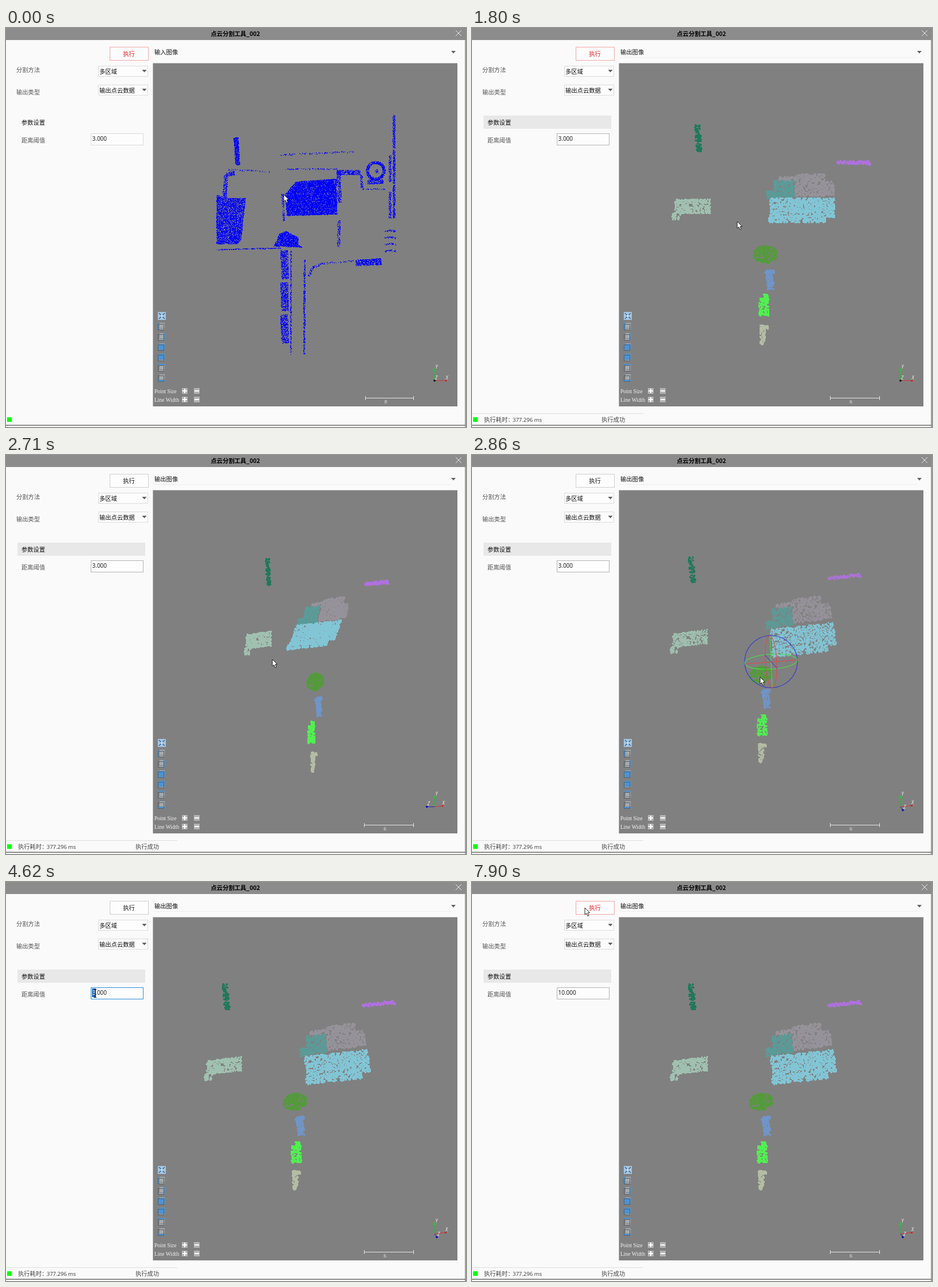
Animation, 803 px wide and 697 px high, one loop 8 s. Source, as an HTML page with a canvas:

```html
<!DOCTYPE html>
<html lang="zh">
<head>
<meta charset="utf-8">
<title>点云分割工具</title>
<style>
  html, body { margin: 0; width: 100%; height: 100%; overflow: hidden; background: #fafafa; }
  canvas { display: block; }
</style>
</head>
<body>
<canvas id="stage" width="803" height="697"></canvas>
<script>
const stage = document.getElementById("stage");
const ctx = stage.getContext("2d");
const LOOP = 8000;
const SANS = '"Noto Sans CJK SC", "Noto Sans CJK", "Noto Sans", sans-serif';
const LATIN = '"Noto Sans", sans-serif';
const SERIF = '"Liberation Serif", serif';

let seed = 7;
const random = () => {
  seed = (seed * 1664525 + 1013904223) % 4294967296;
  return seed / 4294967296;
};
const lerp = (a, b, u) => a + (b - a) * u;
const progress = (t, from, to) => Math.min(1, Math.max(0, (t - from) / (to - from)));
const during = (t, from, to) => t >= from && t < to;
const pairs = flat => Array.from({ length: flat.length / 2 }, (_, i) => [flat[2 * i], flat[2 * i + 1]]);

// ---- raw scan: single-pixel dots, rendered once ----
const scan = document.createElement("canvas");
scan.width = stage.width;
scan.height = stage.height;
const ink = scan.getContext("2d");
ink.fillStyle = "#0000ff";
const speck = (x, y) => ink.fillRect(Math.round(x), Math.round(y), 1, 1);

function patch(density, ...flat) {
  const path = new Path2D();
  pairs(flat).forEach(([x, y]) => path.lineTo(x, y));
  const xs = flat.filter((_, i) => i % 2 === 0), ys = flat.filter((_, i) => i % 2);
  const left = Math.min(...xs), w = Math.max(...xs) - left;
  const top = Math.min(...ys), h = Math.max(...ys) - top;
  for (let i = w * h * density; i > 0; i--) {
    const x = left + random() * w, y = top + random() * h;
    if (ctx.isPointInPath(path, x, y)) speck(x, y);
  }
}
function trail(width, density, ...flat) {
  const pts = pairs(flat);
  pts.slice(1).forEach(([bx, by], k) => {
    const [ax, ay] = pts[k], len = Math.hypot(bx - ax, by - ay);
    for (let i = len * width * density; i > 0; i--) {
      const u = random(), off = (random() - 0.5) * width / len;
      speck(lerp(ax, bx, u) - (by - ay) * off, lerp(ay, by, u) + (bx - ax) * off);
    }
  });
}
const ring = (x, y, r, width, count) => {
  for (let i = 0; i < count; i++) {
    const a = random() * 2 * Math.PI, d = r + (random() - 0.5) * width;
    speck(x + d * Math.cos(a), y + d * Math.sin(a));
  }
};

function renderScan() {
  // left bracket
  trail(8, 2, 401, 191, 404, 239);
  trail(7, 0.9, 399, 253, 384, 256, 381, 295);
  trail(3, 0.25, 386, 247, 465, 251);
  patch(1.4, 367, 291, 388, 297, 418, 297, 410, 370, 403, 377, 367, 377);
  trail(2, 0.9, 367, 387, 480, 384);
  // centre plate and the edges around it
  patch(2.2, 506, 268, 576, 263, 578, 325, 490, 328, 487, 290);
  trail(3, 0.35, 479, 221, 607, 216);
  trail(3, 0.35, 487, 246, 577, 246);
  trail(4, 0.6, 482, 290, 485, 338);
  trail(7, 0.8, 580, 250, 582, 305);
  trail(9, 1, 577, 252, 618, 252);
  trail(4, 0.9, 620, 256, 621, 279);
  trail(2, 0.5, 621, 281, 662, 281);
  trail(5, 0.6, 581, 335, 580, 382);
  // round part
  ring(645, 249, 14.5, 5, 700);
  ring(647, 250, 2, 4, 25);
  trail(8, 1.2, 631, 268, 658, 268);
  // right rails, then the shelves below them
  for (let y = 152; y < 300; y += 61) trail(4, 1.2, 677, y, 677, y + 58);
  for (let y = 222; y < 300; y += 64) trail(4, 1, 670, y, 670, y + 46);
  for (let y = 355; y < 392; y += 11.6) trail(3, 0.8, 661, y, 671, y - 2, 680, y);
  // lower shapes
  patch(2, 467, 381, 477, 359, 488, 354, 510, 366, 510, 378, 517, 383);
  trail(11, 1.2, 610, 410, 655, 408);
  trail(3, 0.35, 550, 411, 655, 403);
  trail(4, 0.7, 528, 434, 534, 419, 550, 412);
  // stem, narrowing downwards
  for (let y = 388; y < 550; y += 56) trail(13, 1, 485, y, 487, y + 50);
  trail(2, 0.9, 497, 388, 497, 570);
  trail(3, 1, 521, 404, 520, 570);
}
renderScan();

// ---- segmented cloud: points in space, seen through linear views ----
// Each view gives screen x and y as weights of [1, x, y, depth].
const FRONT = [[0, 1, 0, 0], [0, 0, 1, 0]];
const SIDE = [[209.5, 0.656, 0, -1], [43.6, -0.08, 1, -0.05]];
const FINAL = [[-8.1, 0.978, 0.03, 0.25], [56.6, -0.106, 0.965, 0.37]];

const segments = [];
// Boxes are [left, top, width, height, lean]; tilt is the depth gained per pixel downwards.
function segment(color, depth, tilt, boxes, round = false) {
  const [, top, , height] = boxes[0], points = [];
  for (const [x, y, w, h, lean = 0] of boxes) {
    for (let i = w * h * 0.24; i > 0; i--) {
      const u = random(), v = random();
      if (round && Math.hypot(u - 0.5, v - 0.5) > 0.5) continue;
      const py = y + v * h;
      points.push([1, x + u * w + lean * v, py, depth + tilt * (py - top - height / 2)]);
    }
  }
  segments.push({ color, points });
}
segment("#20785a", 0, 0, [[389, 169, 9, 47, 3]]);
segment("#b070e0", 0, 0, [[637, 232, 55, 6], [690, 232, 4, 8, 4]]);
segment("#96929a", 31, 0.3, [[564, 255, 52, 39], [536, 260, 30, 9], [614, 268, 18, 24]]);
segment("#5a9b98", 36, 0.3, [[527, 266, 36, 30], [514, 285, 14, 13]]);
segment("#82c5d5", 53, 0.45, [[520, 297, 113, 34], [518, 329, 99, 11]]);
segment("#a0c0b0", 12, 0, [[354, 299, 62, 25], [352, 322, 14, 13, -5]]);
segment("#549a3c", 0, 0, [[491, 380, 42, 31]], true);
segment("#7095c8", 0, 0, [[512, 423, 12, 34, 4], [511, 423, 17, 5]]);
segment("#50f050", 7, 0, [[501, 472, 17, 31], [508, 465, 10, 8]]);
segment("#b4bca4", 2, 0, [[503, 519, 9, 34], [503, 519, 14, 7]]);

function cameraAt(t) {
  if (t < 2200) return FRONT;
  const u = t < 2860 ? 0.13 * progress(t, 2200, 2710) : 1;
  return SIDE.map((row, i) => row.map((v, k) => lerp(v, FINAL[i][k], u)));
}

function drawSegments(t, dragging) {
  const size = dragging ? 2.5 : 3;
  const [vx, vy] = cameraAt(t);
  const dot3 = (row, p) => row[0] + row[1] * p[1] + row[2] * p[2] + row[3] * p[3];
  for (const { color, points } of segments) {
    ctx.fillStyle = color;
    for (const p of points)
      ctx.fillRect(Math.round(dot3(vx, p) - 1.5), Math.round(dot3(vy, p) - 1.5), size, size);
  }
}

// ---- pointer: each move runs from start to end time towards x, y ----
const moves = [
  [100, 270, 534, 329], [900, 1220, 530, 348], [1300, 1380, 493, 349], [1450, 1650, 466, 335],
  [1750, 2050, 449, 352], [2150, 2200, 436, 334], [2600, 2860, 503, 388], [3100, 3290, 165, 198],
  [3500, 4470, 148, 194], [4500, 4620, 155, 194], [6900, 7070, 195, 165], [7070, 7590, 199, 52], [7650, 7750, 197, 45]
];
const pointerAt = t => moves.reduce(([x, y], [from, to, nx, ny]) => {
  const u = progress(t, from, to);
  return [lerp(x, nx, u), lerp(y, ny, u)];
}, [485, 291]);

// ---- drawing helpers ----
function rect(x, y, w, h, fill, border) {
  if (fill) { ctx.fillStyle = fill; ctx.fillRect(x, y, w, h); }
  if (border) { ctx.strokeStyle = border; ctx.lineWidth = 1; ctx.strokeRect(x + 0.5, y + 0.5, w - 1, h - 1); }
}
function text(str, x, y, color = "#111", font = "10.3px " + SANS, align = "left") {
  ctx.font = font; ctx.fillStyle = color; ctx.textAlign = align;
  ctx.fillText(str, x, y);
}
function line(color, width, ...flat) {
  ctx.strokeStyle = color; ctx.lineWidth = width;
  ctx.beginPath();
  pairs(flat).forEach(([x, y]) => ctx.lineTo(x, y));
  ctx.stroke();
}
function shape(fill, ...flat) {
  ctx.fillStyle = fill;
  ctx.beginPath();
  pairs(flat).forEach(([x, y]) => ctx.lineTo(x, y));
  ctx.fill();
}
function oval(color, rx, ry, angle = 0) {
  ctx.strokeStyle = color; ctx.lineWidth = 1.1;
  ctx.beginPath();
  ctx.ellipse(522, 361, rx, ry, angle, 0, 7);
  ctx.stroke();
}
function dot(color, x, y, r) {
  ctx.fillStyle = color;
  ctx.beginPath();
  ctx.arc(x, y, r, 0, 7);
  ctx.fill();
}
const downArrow = (x, y) => shape("#606060", x - 4, y - 2, x + 4, y - 2, x, y + 2.5);

function combo(label, y, hover) {
  rect(161, y, 87, 19, "#fdfdfd", hover ? "#7ab8e8" : "#dcdcdc");
  text(label, 163, y + 13.5);
  downArrow(241.5, y + 9);
}

function thresholdField(t) {
  const value = t < 5900 ? "3.000" : t < 6050 ? "1.000" : "10.000";
  const active = during(t, 3290, 7900);
  rect(148, 184, 92, 21, "#fdfdfd", active ? "#2a90e0" : t < 150 ? "#dadada" : "#b4b4b4");
  text(value, 150.5, 197, "#222", "10px " + LATIN);
  if (during(t, 4230, 5900)) {
    rect(150, 186, 7, 15, "#1874cd");
    text("3", 150.5, 197, "#fff", "10px " + LATIN);
  }
  if (during(t, 5470, 6610) || during(t, 7070, 7750)) rect(t < 6050 ? 156 : 162, 186, 1, 14, "#111");
}

function panel(t) {
  const ran = t >= 150;
  const hot = t < 2200 || t >= 7470;
  rect(0, 0, 803, 697, "#fafafa");
  rect(0, 0, 803, 21, "#8c8c8c");
  rect(801, 21, 2, 676, "#a0a0a0");
  rect(0, 693, 803, 2, "#8c8c8c");
  text("点云分割工具_002", 400.5, 14, "#000", "bold 10.3px " + SANS, "center");
  line("#e8e8e8", 1, 785, 4, 795, 14);
  line("#e8e8e8", 1, 795, 4, 785, 14);

  rect(181, 33, 68, 24, "#fdfdfd", hot ? "#f2a8a8" : "#d0d0d0");
  text("执行", 214.5, 48.5, hot ? "#f01818" : "#111", undefined, "center");
  text(ran ? "输出图像" : "输入图像", 259, 46);
  if (ran) rect(257, 51, 520, 1, "#eeeeee");
  downArrow(781, 42);

  text("分割方法", 18, 77, "#555");
  text("输出类型", 18, 116, "#555");
  combo("多区域", 66);
  combo("输出点云数据", 99, during(t, 7320, 7470));
  if (ran) rect(20, 153, 223, 23, "#e8e8e8");
  text("参数设置", 27, 169, "#111", "500 10.3px " + SANS);
  text("距离阈值", 27, 200, "#555");
  thresholdField(t);

  rect(2, 680, 8, 8, "#00ff00");
  if (ran) {
    rect(0, 673, 299, 1, "#dedede");
    text("执行耗时：", 21, 687.5, "#444");
    text("377.296 ms", 71, 687.5, "#444", "9.5px " + LATIN);
    text("执行成功", 226, 687.5, "#444");
  }
}

function toolbar() {
  rect(265, 496, 14, 14, "#a8c6de");
  line("#2f6ea8", 1.6, 267, 498, 277, 508);
  line("#2f6ea8", 1.6, 277, 498, 267, 508);
  dot("#dce8f2", 272, 503, 2);
  // one cube per face: left, right, front, back, top, bottom
  for (let i = 0; i < 6; i++) {
    const axis = i >> 1, far = i & 1, top = Math.round(514 + i * 17.9);
    rect(267, top + 1, 10, 12, "#a6aaad");
    if (axis === 0) rect(265 + far * 10, top + 1, 3, 12, "#4a94d8");
    if (axis === 1) rect(265 + far, top + 2 - far, 12, 11, "#4a94d8");
    if (axis === 2) rect(266, top + far * 10, 12, 3, "#4a94d8");
    rect(267, top, 11, 11, null, "#7c868c");
    rect(265, top + 3, 11, 11, null, "#596066");
  }
  ["Point Size", "Line Width"].forEach((label, i) => {
    const y = 629 + i * 15;
    text(label, 259, y + 8.5, "#f0f0f0", "9.5px " + SERIF);
    for (const x of [307, 328]) {
      rect(x, y, 10, 10, "#b4b4b4");
      rect(x + 1, y + 4, 8, 2, "#fff");
    }
    rect(311, y + 1, 2, 8, "#fff");
  });
}

function scaleBar(t) {
  const first = t < 580, left = first ? 627.5 : 625.5;
  line("#e4e4e4", 1, left, 643, left, 650);
  line("#e4e4e4", 1, 711.5, 643, 711.5, 650);
  line("#e4e4e4", 1, left, 646.5, 711.5, 646.5);
  text(first ? "8" : "6", first ? 663 : 661.5, 656, "#eee", "9px " + SERIF, "center");
}

function axes(t) {
  const view = cameraAt(t);
  const ox = 748, oy = view === FRONT ? 616 : 614.5;
  const xx = ox + 20 * view[0][1], xy = oy + 20 * view[1][1];
  const zx = ox + 16 * view[0][3], zy = oy + 16 * view[1][3];
  line("#20c030", 1, ox, oy, ox, 598);
  line("#d83030", 1, ox, oy, xx, xy);
  line("#2020d0", 1, ox, oy, zx, zy);
  shape("#20d030", ox - 2, 599, ox + 2, 599, ox, 594);
  dot("#e01818", xx, xy, 1.6);
  dot(view === FRONT ? "#000018" : "#0808c0", zx, zy, 1.8);
  const font = "italic 8px " + LATIN;
  text("Y", ox + 1.5, 595, "#eee", font);
  text("X", xx - 0.5, xy - 2, "#eee", font);
  text("Z", zx + 1, zy - 2.5, "#eee", font);
}

function rotationSphere() {
  oval("#3434d8", 46, 45.5);
  oval("#48e048", 46, 13, -0.06);
  oval("#e04848", 10, 45, -0.05);
  line("#e04848", 1, 477, 365, 568, 358);
  line("#48e048", 1, 520, 316, 524, 406);
  line("#3434d8", 1, 511, 349, 533, 373);
}

function drawPointer(t) {
  if (during(t, 5900, 7070)) return;
  const [x, y] = pointerAt(t).map(Math.round);
  if (during(t, 3290, 5900)) {
    rect(x, y - 6, 1, 13, "#111");
    for (const end of [-7, 7]) rect(x - 2, y + end, 5, 1, "#111");
    return;
  }
  const outline = [0, 0, 0, 12, 2.8, 9.6, 5, 14.5, 7, 13.6, 5, 8.8, 8.6, 8.6, 0, 0];
  ctx.save();
  ctx.translate(x, y);
  shape("#fff", ...outline);
  line("#111", 0.9, ...outline);
  ctx.restore();
}

function draw(t) {
  panel(t);
  rect(256.5, 61.5, 531.5, 599.5, "#808080");
  const dragging = during(t, 2860, 3170);
  if (t < 580) ctx.drawImage(scan, 0, 0);
  else drawSegments(t, dragging);
  if (dragging) rotationSphere();
  toolbar();
  scaleBar(t);
  axes(t);
  drawPointer(t);
}

const start = performance.now();
function tick() {
  draw((performance.now() - start) % LOOP);
  requestAnimationFrame(tick);
}
tick();
</script>
</body>
</html>
```
